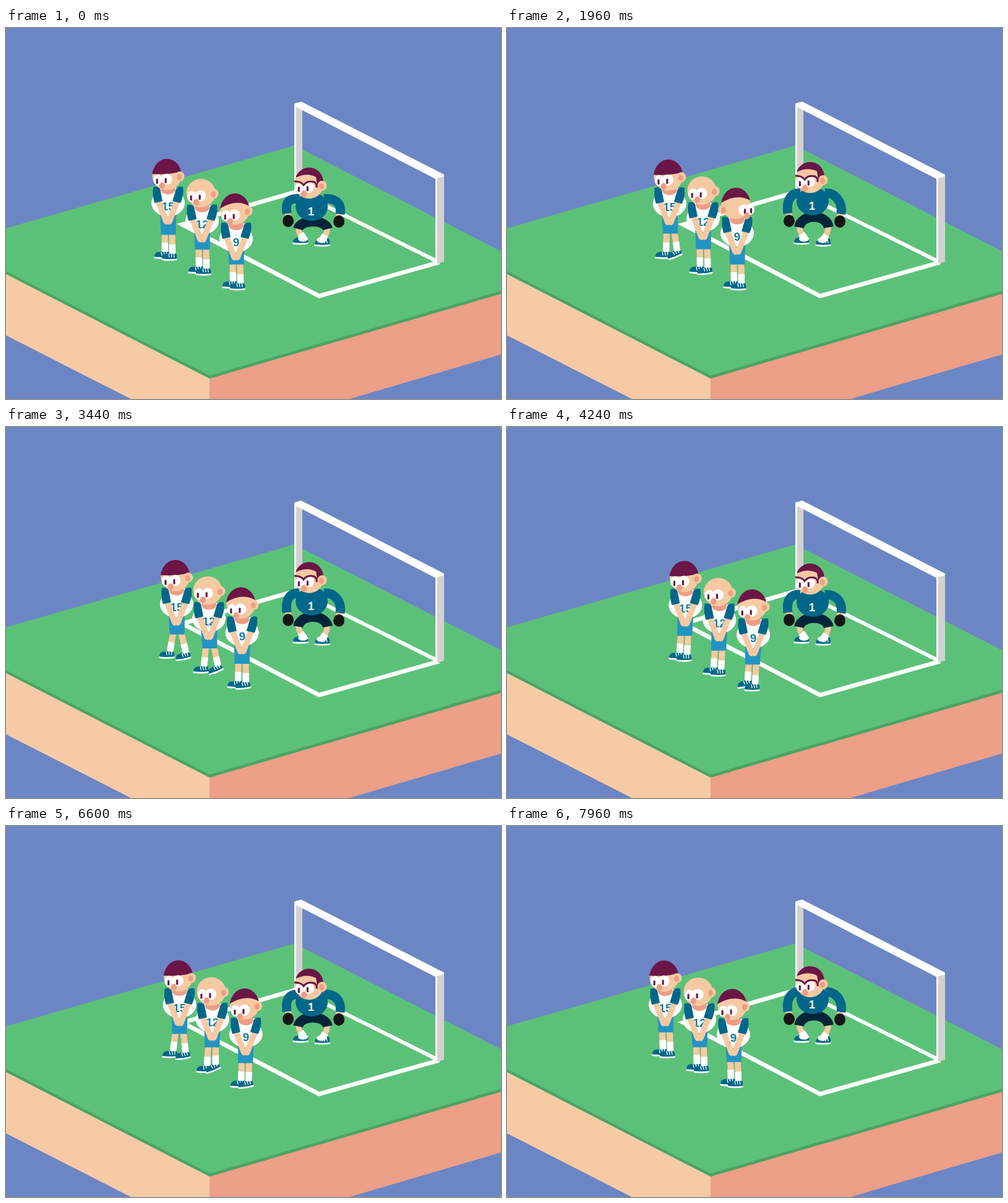
An HTML page for the animation above (8000 ms loop, 800 by 600 pixels).

```html
<!DOCTYPE html>
<html lang="en">
<head>
<meta charset="utf-8">
<title>Free kick wall</title>
<style>
html, body { margin: 0; width: 100%; height: 100%; overflow: hidden; background: #6c86c5; }
svg { display: block; width: 100%; height: 100%; }
text { font: bold 19px "Liberation Sans", Arial, sans-serif; text-anchor: middle; }
</style>
</head>
<body>
<svg viewBox="0 0 800 600">
  <rect width="800" height="600" fill="#6c86c5"/>
  <path fill="#f7caa6" d="M0 396L329 565V600H202L0 497Z"/>
  <path fill="#ed9f87" d="M329 565L800 428V528L555 600H329Z"/>
  <path fill="#4ba463" d="M0 392L329 560L800 423V430L329 567L0 398Z"/>
  <path fill="#5cc178" d="M0 324L466 190L800 361V425L329 562L0 393Z"/>
  <path fill="none" stroke="#fff" stroke-width="7" d="M700 379L506 433.500L285 318L470 264.500"/>
  <path fill="none" stroke="#fff" stroke-width="6" d="M470 264.500L700 379"/>
  <path fill="#d2d0d0" d="M469 126H479V263L469 266ZM697 240H708V378L697 381Z"/>
  <path fill="#fff" d="M466 122L477 119L708 237V240L697 243V381L694 379V244L479 133L469 128V266L466 265Z"/>
  <g id="cast"></g>
</svg>
<script>
const LOOP = 8000;
const C = { skin: '#f7c9a2', blush: '#ef9d85', hair: '#6b1646', teal: '#00678a', blue: '#2394c2',
  ink: '#147fa5', navy: '#03253a', white: '#fff', glove: '#161616' };

// i: place in the wall; hairline: how far down the forehead the hair comes
const wall = [
  { i: 0, number: '15', hairline: -1, eyeY: 6 },
  { i: 1, number: '12', hairline: null, eyeY: 5 },
  { i: 2, number: '9', hairline: -19, eyeY: 8 }
];
// sideways shuffles of the whole wall
const moves = [
  { start: 1800, dx: 8 },
  { start: 3150, dx: 14 },
  { start: 5750, dx: -9 },
  { start: 6780, dx: -18 }
];

const clamp = v => Math.max(0, Math.min(1, v));
const ease = v => { v = clamp(v); return v * v * (3 - 2 * v); };
const mix = (a, b, p) => a + (b - a) * p;
const bell = (t, mid, reach) => ease(1 - Math.abs(t - mid) / reach);

// eased value through [time, value] points
function track(t, points) {
  return points.reduce((value, [end, next], i) =>
    i ? mix(value, next, ease((t - points[i - 1][0]) / (end - points[i - 1][0]))) : next, 0);
}

const shape = (d, fill) => `<path d="${d}" fill="${fill}"/>`;
const line = (d, color, width, cap = 'butt') =>
  `<path d="${d}" fill="none" stroke="${color}" stroke-width="${width}" stroke-linecap="${cap}"/>`;
const oval = (x, y, rx, ry, fill) => `<ellipse cx="${x}" cy="${y}" rx="${rx}" ry="${ry}" fill="${fill}"/>`;
const at = (x, y, body, turn = 0) => `<g transform="translate(${x} ${y}) rotate(${turn})">${body}</g>`;

const shoe = line('M-11 5Q0 6.500 11 5', C.white, 3.5, 'round') +
  shape('M-12 4Q-12 -4 -4 -4L10 -6Q13 -1 12 4Q0 5.500 -12 4Z', C.teal) +
  line('M-1 -4L0 2M3 -5L4 2M7 -5L8 2', C.white, 1.3);

const ear = (x, y) => oval(x, y, 7.5, 8, C.skin) + oval(x - Math.sign(x), y + 1, 4, 5, C.blush);

function eye(x, y, rx, look) {
  return oval(x, y, rx, 9, C.white) +
    `<rect x="${x + look * 1.5 - 1.6}" y="${y - 2}" width="3.200" height="8.500" rx="1.500" fill="${C.hair}"/>`;
}

function face(look, eyeY) {
  const a = -1.5 + 14.5 * look, b = a + 14 - 4 * Math.max(0, look);
  const left = eye(a, eyeY + .5, look < 0 ? 7.5 : 9, look);
  const right = eye(b, eyeY - .5, look < 0 ? 9 : 7, look);
  return (look < 0 ? left + right : right + left) + oval((a + b) / 2, eyeY + 10, 4.5, 5.5, C.blush);
}

function head(look, eyeY, hairline) {
  const side = look < .25 ? 1 : -1;
  const farEar = Math.abs(look) < .7 ? ear(-20 * side, 3) : '';
  const hair = hairline === null ? '' :
    shape(`M-24 -3C-18 -35 16 -35 23 -7Q2 ${hairline} -24 -3Z`, C.hair);
  return farEar + oval(0, 0, 23.5, 23, C.skin) + hair +
    ear(21 * side, side > 0 ? 1 : 8) + face(look, eyeY);
}

function leg(hx, hy, foot) {
  const ax = foot.x + 5, ay = foot.y - 4, sock = 15 / (ay - hy);
  return line(`M${hx} ${hy}L${ax} ${ay}`, C.skin, 10) + at(foot.x, foot.y, shoe, foot.turn) +
    line(`M${mix(ax, hx, sock)} ${mix(ay, hy, sock)}L${ax} ${ay}`, C.white, 10.5);
}

// men nearest the goal of the shuffle start first, each with the leading foot
const startOf = (move, i) => move.start + 130 * (move.dx > 0 ? i : 2 - i);

function foot(i, side, t) {
  let dx = 0, lift = 0;
  for (const move of moves) {
    const leads = move.dx * side > 0;
    const p = clamp((t - startOf(move, i) - (leads ? 0 : 550)) / 350);
    dx += move.dx * ease(p * 1.5);
    lift += Math.sin(p * Math.PI);
  }
  return {
    x: 258 + 55 * i + 6 * side + dx,
    y: 367.5 + 24 * i + 1.5 * side + .15 * dx - 5 * lift,
    turn: -22 * lift
  };
}

function player({ i, number, hairline, eyeY }, t) {
  const left = foot(i, -1, t), right = foot(i, 1, t);
  const sway = moves.reduce((sum, m) => sum + 1.2 * m.dx * ease((t - startOf(m, i)) / 900), 0);
  const bob = track(t, [[0, 5 * i - 2], [1900, -1], [2720, 3 - 6 * i], [3600, -1], [5760, -1], [7960, 5]]);
  const x = 262 + 55 * i + sway, y = 282 + 24 * i + bob + .15 * sway;
  // the last man glances back at the keeper
  const glance = i === 2 ? 1.9 * bell(t, 1960, 500) + 1.5 * bell(t, 5760, 500) : 0;
  const look = -.9 + .45 * bell(t, 2720, 600) + glance;
  const px = mix(x, (left.x + right.x) / 2 + 5, .4), py = (left.y + right.y) / 2 - 47;
  const chest =
    oval(0, 3, 27, 22, C.white) + shape('M-19 -22H19L24 0H-24Z', C.white) +
    oval(0, -19, 12, 8, C.blush) +
    `<text y="15" fill="${C.ink}">${number}</text>` +
    line('M-16 -1L-3 33', C.skin, 9.5, 'round') + line('M15 -1L2 33', C.skin, 9.5, 'round') +
    shape('M-24 -23Q-16 -25 -13 -20L-9 0L-22 3Q-26 -10 -24 -23Z', C.teal) +
    shape('M24 -23Q16 -25 13 -20L7 0L20 3Q26 -10 24 -23Z', C.teal);
  return leg(px - 6, py + 8, left) + leg(px + 6, py + 8, right) +
    shape(`M${x - 13} ${y + 18}H${x + 13}L${px + 12} ${py + 14}H${px - 12}Z`, C.blue) +
    at(x, y, chest) + at(x - 2, y - 41 - i, head(look, eyeY, hairline));
}

const keeperHead = oval(0, 0, 23.5, 24, C.skin) +
  shape('M-22 -10C-15 -32 18 -33 23 -5L21 1H13L11 -11Q-4 -19 -22 -10Z', C.hair) +
  ear(21, 3) + face(-.95, 6) +
  line('M-24 -4Q-13 -4 -9 2Q-3 -6 8 -3Q13 0 12 6', C.hair, 3);

function keeper(t) {
  const out = bell(t, 650, 600), shift = bell(t, 5760, 700), rise = bell(t, 4980, 600);
  const x = 494 + 6 * shift;
  const y = track(t, [[0, 290], [1000, 281], [2800, 281], [4240, 285], [4980, 262], [5760, 290], [6600, 286], [7960, 282]]);
  const headY = y - 38 + 9 * ease((t - 5200) / 500);
  const knee = 316 + .3 * (y - 280), hip = y + 19;
  const arm = (s, gx, gy, reach) => {
    const wx = gx - s * reach, wy = gy - 12;
    return line(`M${wx} ${wy}L${gx} ${gy}`, C.skin, 10) +
      line(`M${x + s * 20} ${y - 14}C${x + s * 36} ${y - 15} ${wx + s * 5} ${wy - 20} ${wx + s * 2} ${wy}`, C.teal, 15) +
      oval(gx, gy, 9, 10, C.glove);
  };
  return line(`M473 ${knee}Q471 ${knee + 12} 480 339`, C.skin, 9) +
    line(`M519 ${knee}Q521 ${knee + 12} 512 341`, C.skin, 9) +
    at(476, 343, shoe) + at(511, 346, shoe) +
    line('M476 333L482 341', C.white, 11) + line('M516 335L511 343', C.white, 11) +
    oval(480, 341, 8, 4.5, C.white) + oval(510, 343, 8, 4.5, C.white) +
    line(`M472 ${knee + 6}C476 ${hip} 516 ${hip} 520 ${knee + 6}`, C.navy, 16) +
    oval(x, y - 1, 26, 23, C.teal) +
    arm(-1, 456 + 5 * shift, 312 + 7 * shift - 12 * rise, 0) +
    arm(1, 538 - 8 * shift + 37 * out, 313 + 7 * shift - 12 * rise - 25 * out, 8 * out) +
    `<text x="${x - 1}" y="${y + 13}" fill="#fff">1</text>` +
    at(x - 4, headY, keeperHead);
}

const cast = document.getElementById('cast');
function draw(now) {
  const t = now % LOOP;
  cast.innerHTML = keeper(t) + wall.map(man => player(man, t)).join('');
}
function tick() {
  draw(performance.now());
  requestAnimationFrame(tick);
}
tick();
</script>
</body>
</html>
```
